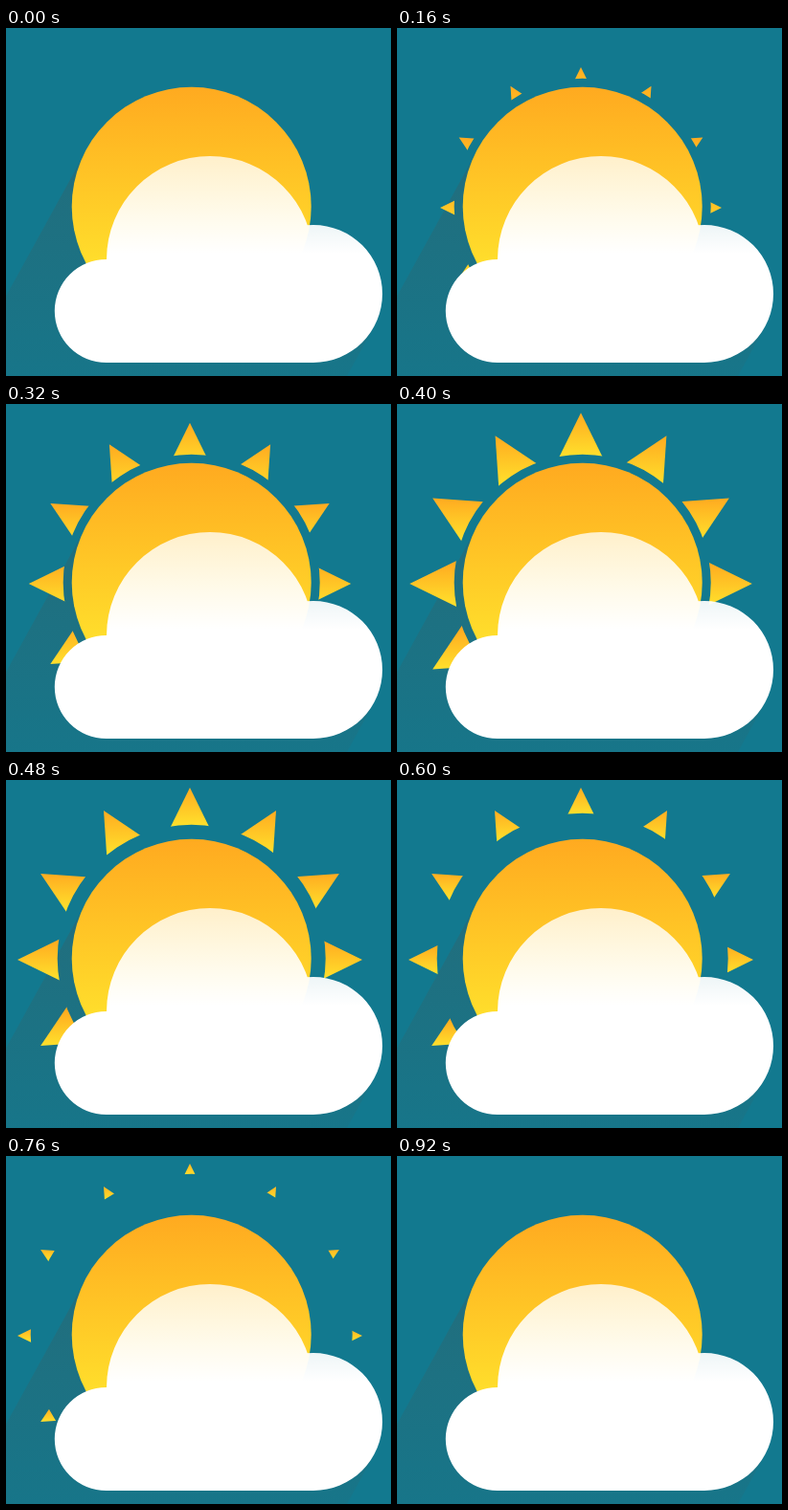
Write an HTML page with a canvas that moves like this. It is 402x364 px and loops after 1 s.

```html
<!DOCTYPE html>
<html lang="en">
<head>
<meta charset="utf-8">
<title>Sun and cloud</title>
<style>
  html, body { margin: 0; width: 100%; height: 100%; overflow: hidden; background: #12798f; }
  canvas { display: block; }
</style>
</head>
<body>
<canvas id="stage" width="402" height="364"></canvas>
<script>
const W = 402, H = 364, LOOP = 1000, STEP = 40;
const TAU = Math.PI * 2;
const ORANGE = '#ffaa20', YELLOW = '#ffe02c';
const sun = { x: 193.7, y: 186.8, r: 125 };
const hub = { x: 192, y: 188 };
const GAP_R = 134, TIP_R = 180, SLOPE = 0.49;
const ctx = document.getElementById('stage').getContext('2d');

function vertical(y0, y1, from, to) {
  const g = ctx.createLinearGradient(0, y0, 0, y1);
  g.addColorStop(0, from);
  g.addColorStop(1, to);
  return g;
}

function polygon(points, fill) {
  ctx.beginPath();
  for (const [x, y] of points) ctx.lineTo(x, y);
  ctx.closePath();
  ctx.fillStyle = fill;
  ctx.fill();
}

function addCircle(x, y, r) {
  ctx.moveTo(x + r, y);
  ctx.arc(x, y, r, 0, TAU);
}

// Isosceles triangle pointing away from the hub
function triangle(angle, tip, len) {
  const s = Math.sin(angle), c = Math.cos(angle);
  const at = (r, side) => [hub.x + r * s + side * c, hub.y - r * c + side * s];
  const half = len * SLOPE;
  return [at(tip, 0), at(tip - len, half), at(tip - len, -half)];
}

function drawShadow() {
  polygon([[84.6, 126.6], [-46, H], [356, H], [384, 313]],
    vertical(130, H, 'rgba(90,70,60,.22)', 'rgba(90,70,60,.07)'));
}

function drawRays(t) {
  const tip = Math.min(TIP_R, 147 + 0.1325 * (t - 160));
  const inner = Math.max(GAP_R, 152 + 0.1 * (t - 600));
  if (tip < GAP_R || inner > TIP_R + 2) return;
  const shown = Math.max(1, TIP_R - inner);
  const shift = (inner - GAP_R) / 10;

  ctx.save();
  ctx.beginPath();
  ctx.rect(0, 0, W, H);
  addCircle(sun.x, sun.y, inner);
  ctx.clip('evenodd');
  for (let k = -4; k <= 3; k++) {
    const angle = k * TAU / 12;
    const ys = triangle(angle, tip, shown).map(p => p[1]);
    const fill = vertical(Math.min(...ys) - shift, Math.max(...ys), ORANGE, YELLOW);
    polygon(triangle(angle, tip, shown + 8), fill);
  }
  ctx.restore();
}

function drawSun() {
  ctx.beginPath();
  addCircle(sun.x, sun.y, sun.r);
  ctx.fillStyle = vertical(62, 254, ORANGE, YELLOW);
  ctx.fill();
}

function drawCloud() {
  ctx.beginPath();
  addCircle(213, 242, 108);
  addCircle(104.8, 296, 54);
  addCircle(321, 278, 72);
  ctx.rect(104.8, 242, 216.2, 108);
  ctx.fillStyle = vertical(134, 236, 'rgba(255,255,255,.76)', '#fff');
  ctx.fill();
}

function draw(now) {
  const t = Math.floor((now % LOOP) / STEP) * STEP;
  ctx.fillStyle = '#12798f';
  ctx.fillRect(0, 0, W, H);
  drawShadow();
  drawRays(t);
  drawSun();
  drawCloud();
}

let start;
function tick(now) {
  start ??= now;
  draw(now - start);
  requestAnimationFrame(tick);
}
draw(0);
requestAnimationFrame(tick);
</script>
</body>
</html>
```
